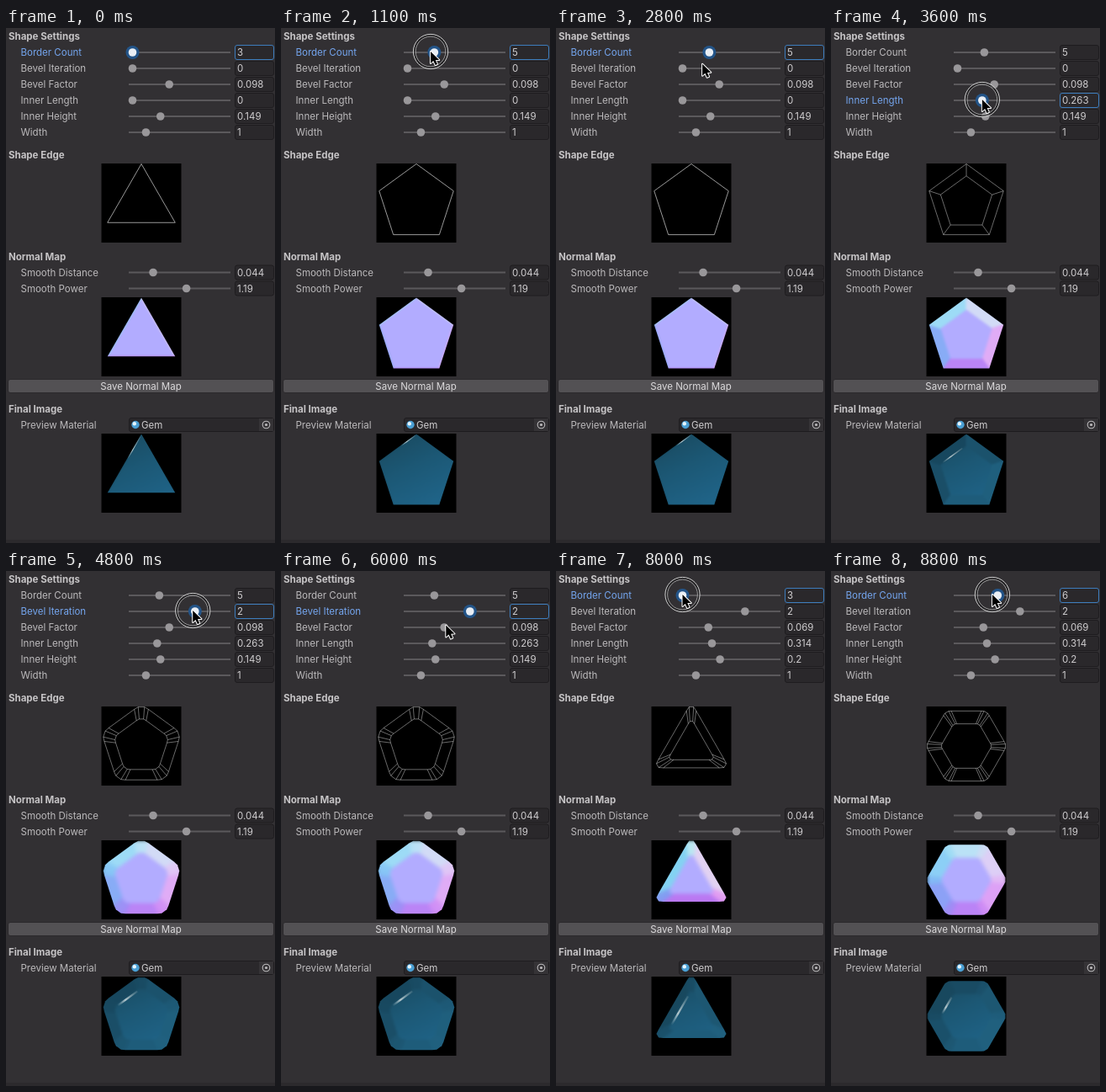
Recreate the animation shown at these times as an HTML page with a canvas. Size 320 px wide and 612 px high, loop 8900 ms.

```html
<!DOCTYPE html>
<html lang="en">
<head>
<meta charset="utf-8">
<title>Shape settings</title>
<style>
html, body { margin: 0; width: 100%; height: 100%; overflow: hidden; background: #323033; }
canvas { display: block; }
</style>
</head>
<body>
<canvas id="stage" width="320" height="612"></canvas>
<script>
const LOOP = 8900, STEP = 100, SIZE = 95, RADIUS = 46.5, ROW = 19, TRAVEL = 600;
const ctx = document.getElementById('stage').getContext('2d');
const buffer = document.createElement('canvas');
buffer.width = buffer.height = SIZE;
const faces = buffer.getContext('2d');

const slider = (label, min, max, value, whole) => ({ label, min, max, value, whole });
const shape = [
  slider('Border Count', 3, 10, 3, true),
  slider('Bevel Iteration', 0, 3, 0, true),
  slider('Bevel Factor', 0, .25, .098),
  slider('Inner Length', 0, 1, 0),
  slider('Inner Height', 0, .5, .149),
  slider('Width', 0, 7, 1)
];
const smooth = [slider('Smooth Distance', 0, .2, .044), slider('Smooth Power', 0, 2.07, 1.19)];
shape.forEach((s, i) => s.y = 29 + ROW * i);
smooth.forEach((s, i) => s.y = 290.5 + ROW * i);

// The whole story: which slider is dragged, when, and to what value.
const drag = (index, start, end, to) => ({ index, start, end, to });
const drags = [
  drag(0, 200, 2000, 6.45), drag(0, 2000, 2700, 5),
  drag(3, 3000, 3600, .263), drag(1, 4000, 4700, 1.93),
  drag(2, 6100, 6400, .069), drag(3, 6500, 6700, .314), drag(4, 6800, 7000, .2),
  drag(0, 7200, 7600, 3), drag(0, 8000, 8800, 5.6)
];

const clamp = u => Math.max(0, Math.min(1, u));
const mix = (a, b, u) => a + (b - a) * u;
const between = (p, q, u) => [mix(p[0], q[0], u), mix(p[1], q[1], u)];
const scale = (points, k) => points.map(([x, y]) => [x * k, y * k]);
const pairs = points => points.map((p, i) => [p, points[(i + 1) % points.length]]);
const handleX = (s, value) => mix(150.5, 262, (value - s.min) / (s.max - s.min));

function stateAt(t) {
  const raw = shape.map(s => s.value);
  const started = drags.filter(d => d.start <= t);
  for (const d of started) raw[d.index] = mix(raw[d.index], d.to, clamp((t - d.start) / (d.end - d.start)));
  const spot = i => [handleX(shape[i], raw[i]), shape[i].y - 1];
  const current = started[started.length - 1], next = drags[started.length];
  const values = raw.map((v, i) => shape[i].whole ? Math.round(v) : v);
  if (!current) return { values, active: 0 };

  let pointer = spot(current.index), pressed = true;
  if (next && next.index !== current.index) {
    const travel = Math.min(TRAVEL, next.start - current.end);
    const u = clamp((t - next.start + travel) / travel);
    pointer = between(pointer, spot(next.index), u * u * (3 - 2 * u));
    pressed = u === 0;
  }
  return { values, active: current.index, pointer, pressed };
}

function text(str, x, y, color = '#bcbabc', weight = 400, align = 'left') {
  ctx.font = `${weight} 11.5px Inter, sans-serif`;
  ctx.textAlign = align;
  ctx.fillStyle = color;
  ctx.fillText(str, x, y + 4);
}

function disc(x, y, r, color) {
  ctx.fillStyle = color;
  ctx.beginPath();
  ctx.arc(x, y, r, 0, 7);
  ctx.fill();
}

function ring(x, y, r, color, width) {
  ctx.strokeStyle = color;
  ctx.lineWidth = width;
  ctx.beginPath();
  ctx.arc(x, y, r, 0, 7);
  ctx.stroke();
}

function box(x, y, w, h, fill, border) {
  ctx.beginPath();
  ctx.roundRect(x, y, w, h, 2.5);
  ctx.fillStyle = fill;
  ctx.fill();
  ctx.strokeStyle = border;
  ctx.lineWidth = 1;
  ctx.stroke();
}

function trace(c, points) {
  c.beginPath();
  points.forEach(([x, y]) => c.lineTo(x, y));
  c.closePath();
}

function drawSlider(s, value, active) {
  const x = handleX(s, value);
  text(s.label, 17.5, s.y, active ? '#74a5ee' : '#bcbabc');
  ctx.fillStyle = '#5b595c';
  ctx.fillRect(146, s.y - 1, 121, 2);
  if (active) disc(x, s.y, 8, '#235488');
  disc(x, s.y, 4.8, active ? '#e9eef4' : '#99979a');
  box(272.5, s.y - 8.5, 46, 17, '#2a282b', active ? '#3d7dbd' : '#1e1c1f');
  text(String(+value.toFixed(3)), 275, s.y, '#cfcdcf');
}

function polygon(n) {
  return Array.from({ length: n }, (_, i) => {
    const a = Math.PI / 2 + Math.PI * (2 * i + 1) / n;
    return [RADIUS * Math.cos(a), RADIUS * Math.sin(a)];
  });
}

// Cuts every corner `times` over, then grows the result back to the full radius.
function bevel(points, times, factor) {
  for (let k = 0; k < times; k++) {
    points = pairs(points).flatMap(([p, q]) => [between(p, q, factor), between(p, q, 1 - factor)]);
  }
  return scale(points, RADIUS / Math.max(...points.map(p => Math.hypot(...p))));
}

function panel(y, draw) {
  ctx.save();
  ctx.beginPath();
  ctx.rect(113.5, y, SIZE, SIZE - 1);
  ctx.fillStyle = '#000';
  ctx.fill();
  ctx.clip();
  ctx.translate(161, y + 47);
  draw();
  ctx.restore();
}

function drawEdges(outer, inner, length) {
  ctx.strokeStyle = `rgba(255,255,255,${length ? .52 : .75})`;
  ctx.lineWidth = .8;
  trace(ctx, outer);
  ctx.stroke();
  if (!length) return;
  trace(ctx, inner);
  outer.forEach((p, i) => {
    ctx.moveTo(...p);
    ctx.lineTo(...inner[i]);
  });
  ctx.stroke();
}

// Paints side faces and top face unblurred, then composites them softened inside the outline.
function drawFaces(outer, inner, sideColor, topColor, blur) {
  faces.setTransform(1, 0, 0, 1, 47.5, 47);
  for (const [p, q] of pairs(outer)) {
    const a = Math.atan2(p[1] + q[1], p[0] + q[0]);
    trace(faces, [[0, 0], ...scale([p, q], 1.8)]);
    faces.fillStyle = faces.strokeStyle = sideColor(Math.cos(a), Math.sin(a));
    faces.fill();
    faces.stroke();
  }
  trace(faces, inner);
  faces.fillStyle = topColor;
  faces.fill();
  ctx.save();
  trace(ctx, outer);
  ctx.clip();
  ctx.filter = `blur(${blur}px)`;
  ctx.drawImage(buffer, -47.5, -47);
  ctx.restore();
}

function normalColor(x, y, z) {
  const channel = n => Math.round(255 * Math.pow((n + 1) / 2, 1 / 2.2));
  return `rgb(${channel(x)},${channel(y)},${channel(z)})`;
}

function drawNormals(outer, inner, n, length, height, bevels) {
  const band = Math.max(.01, 1.17 * length * RADIUS * Math.cos(Math.PI / n) / SIZE);
  const tilt = .68 * Math.sin(Math.atan(height / band));
  const side = (x, y) => normalColor(x * tilt, -y * tilt, Math.sqrt(1 - tilt * tilt));
  drawFaces(outer, inner, side, '#b2acff', 1.4 + bevels * .3);
}

function drawGem(base, outer, inner, length, bevels) {
  const side = (x, y) => {
    const light = .95 + .1 * (x + y);
    return `rgb(${[29, 88, 116].map(v => Math.round(v * light)).join()})`;
  };
  const top = faces.createLinearGradient(-20, -42, 20, 42);
  top.addColorStop(0, '#1a4c63');
  top.addColorStop(.4, '#1c5875');
  top.addColorStop(1, '#20658a');
  drawFaces(outer, inner, side, top, .8 + bevels * .4);

  // Glint on the upper left edge.
  const lean = ([p, q]) => p[0] + q[0] + 1.01 * (p[1] + q[1]);
  const edge = pairs(base).reduce((best, e) => lean(e) < lean(best) ? e : best);
  const [p, q] = scale(edge, length ? 1 - 1.1 * length : .985);
  const from = between(p, q, length ? .1 : .58), to = between(p, q, length ? .85 : .97);
  const shine = ctx.createLinearGradient(...from, ...to);
  shine.addColorStop(0, 'rgba(190,215,220,0)');
  shine.addColorStop(.4, 'rgba(220,230,230,.8)');
  shine.addColorStop(1, 'rgba(190,205,205,.15)');
  ctx.save();
  trace(ctx, outer);
  ctx.clip();
  ctx.filter = 'blur(.4px)';
  ctx.strokeStyle = shine;
  ctx.lineWidth = bevels ? 2.2 : 1.5;
  ctx.beginPath();
  ctx.moveTo(...from);
  ctx.lineTo(...to);
  ctx.stroke();
  ctx.restore();
}

function drawPointer([x, y], pressed) {
  if (pressed) {
    ring(x, y, 19.2, 'rgba(20,20,22,.6)', 2);
    ring(x, y, 20.6, '#d0d0d0', 1);
    ring(x, y, 17.9, '#b4b4b4', .8);
  }
  const arrow = [[0, 0], [0, 14], [3.3, 11], [5.6, 16], [8, 15], [5.8, 10.1], [10.2, 10]];
  trace(ctx, arrow.map(([dx, dy]) => [x + dx, y + dy]));
  ctx.lineJoin = 'round';
  ctx.strokeStyle = '#fff';
  ctx.lineWidth = 2;
  ctx.stroke();
  ctx.fillStyle = '#000';
  ctx.fill();
  ctx.lineJoin = 'miter';
}

function drawMaterialRow(y) {
  text('Preview Material', 17.5, y);
  box(146.5, y - 8, 172, 16, '#2a282b', '#1e1c1f');
  ctx.fillStyle = '#353336';
  ctx.fillRect(301, y - 7.5, 17, 15);
  disc(154, y, 4.7, '#4a9fd4');
  disc(152.8, y - 1.2, 2.2, '#e6f5fc');
  text('Gem', 161, y, '#cfcdcf');
  ring(309.5, y, 4.3, '#bcbabc', 1.1);
  disc(309.5, y, 1.6, '#bcbabc');
}

function render(t) {
  ctx.fillStyle = '#323033';
  ctx.fillRect(0, 0, 320, 612);
  ctx.fillStyle = '#2c2a2d';
  ctx.fillRect(0, 608, 320, 4);

  const heading = (title, y) => text(title, 3, y, '#c6c4c6', 700);
  heading('Shape Settings', 10);
  heading('Shape Edge', 150.5);
  heading('Normal Map', 271.5);
  heading('Final Image', 452.5);

  const { values, active, pointer, pressed } = stateAt(t);
  shape.forEach((s, i) => drawSlider(s, values[i], i === active));
  smooth.forEach(s => drawSlider(s, s.value, false));

  const [n, bevels, factor, length, height] = values;
  const base = polygon(n);
  const outer = bevel(base, bevels, factor);
  const inner = scale(outer, 1 - 1.17 * length);
  panel(161, () => drawEdges(outer, inner, length));
  panel(320, () => drawNormals(outer, inner, n, length, height, bevels));
  panel(482, () => drawGem(base, outer, inner, length, bevels));

  box(2.5, 417.5, 316, 16, '#535154', '#2b292c');
  text('Save Normal Map', 160.5, 425.5, '#dcdadc', 400, 'center');
  drawMaterialRow(471.5);

  if (pointer) drawPointer(pointer, pressed);
}

function tick(now) {
  render(Math.floor(now % LOOP / STEP) * STEP);
  requestAnimationFrame(tick);
}
render(0);
requestAnimationFrame(tick);
</script>
</body>
</html>
```
